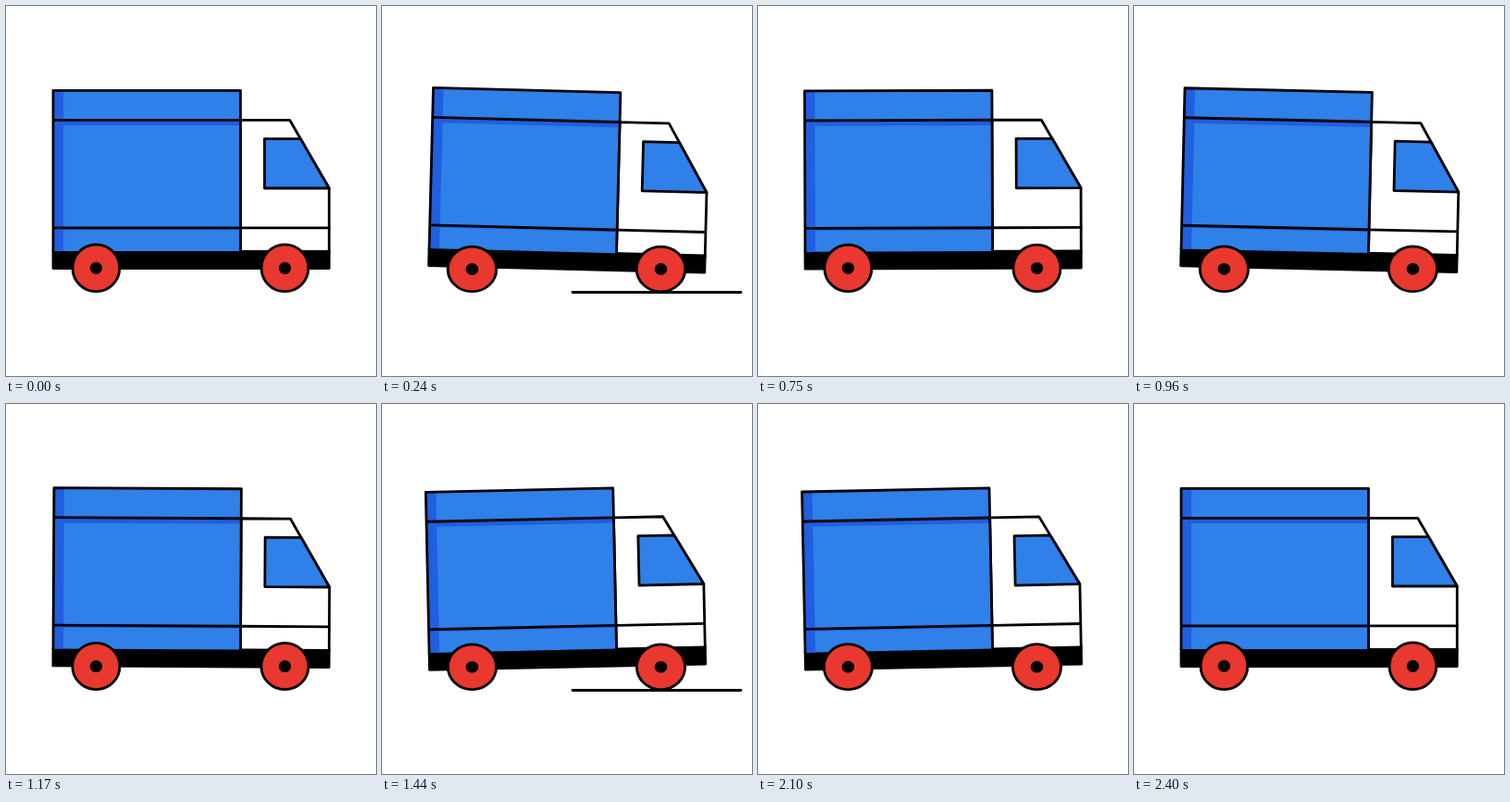
An HTML page for the animation above (2.46 s loop, 400 px wide and 400 px high).

```html
<!DOCTYPE html>
<html lang="en">
<head>
<meta charset="utf-8">
<title>Truck</title>
<style>
  html, body { margin: 0; width: 100%; height: 100%; overflow: hidden; background: #fff; }
  svg { display: block; width: 100%; height: 100%; }
</style>
</head>
<body>
<svg viewBox="0 0 400 400" stroke="#000" stroke-width="2.8" stroke-linecap="round" stroke-linejoin="round">
  <defs>
    <g id="wheel">
      <circle r="25.4" fill="#e8382f"/>
      <circle r="6.6" fill="#000" stroke="none"/>
    </g>
  </defs>
  <path id="road"/>
  <g id="body">
    <path d="M253.5 123.3H306.7L349.3 197V266H253.5Z" fill="#fff"/>
    <path d="M279.5 143.6H318.4L349.3 197H279.5Z" fill="#2f80e8"/>
    <path d="M253.5 239.8H349.3"/>
    <path d="M51 265.3H349.3V283.5H51Z"/>
    <path d="M51 91.3H253.5V265H51Z" fill="#2f80e8" stroke="none"/>
    <path d="M51 91.3H62V265H51ZM51 123.3H253.5V129H51ZM51 239.8H253.5V242H51Z" fill="#1f5fe0" stroke="none"/>
    <path d="M53 123.3H251M53 239.8H251"/>
    <path d="M51 265V91.3H253.5V265" fill="none"/>
  </g>
  <use class="wheel" href="#wheel" data-x="97.4"/>
  <use class="wheel" href="#wheel" data-x="301.5"/>
</svg>
<script>
const LOOP = 2460, END = 2400, STEP = 30;
const SWAY = 800, PASS = 1200, MAX_TILT = 1.52;
const GROUND = 309.5, AXLE = 283.3;

const body = document.getElementById('body');
const road = document.getElementById('road');
const wheels = document.querySelectorAll('.wheel');

// Times and tilts (in units of MAX_TILT) of one sway
const keys = [[0, 0], [210, 1], [580, -1], [SWAY, 0]];
const smooth = p => p * p * (3 - 2 * p);

function sway(t) {
  const i = keys.findIndex(([time]) => t < time);
  const [t0, a] = keys[i - 1], [t1, b] = keys[i];
  return a + (b - a) * smooth((t - t0) / (t1 - t0));
}

function draw(t) {
  const tilt = sway(t % SWAY), squash = Math.abs(tilt);
  body.setAttribute('transform',
    `translate(0 ${0.9 * squash}) rotate(${MAX_TILT * tilt} 200 264)`);

  const sx = 1 + 0.035 * squash, sy = 1 - 0.045 * squash;
  for (const wheel of wheels) {
    const y = GROUND + (AXLE - GROUND) * sy;
    wheel.setAttribute('transform', `translate(${wheel.dataset.x} ${y}) scale(${sx} ${sy})`);
  }

  const s = t % PASS - 240;
  const left = 206 - 1.05 * s - 0.00033 * s * s;
  const right = 388 - 0.756 * s - 0.000325 * s * s;
  road.setAttribute('d', `M${left} ${GROUND}H${right}`);
}

function tick() {
  const t = Math.floor(performance.now() % LOOP / STEP) * STEP;
  draw(Math.min(t, END));
  requestAnimationFrame(tick);
}
tick();
</script>
</body>
</html>
```
